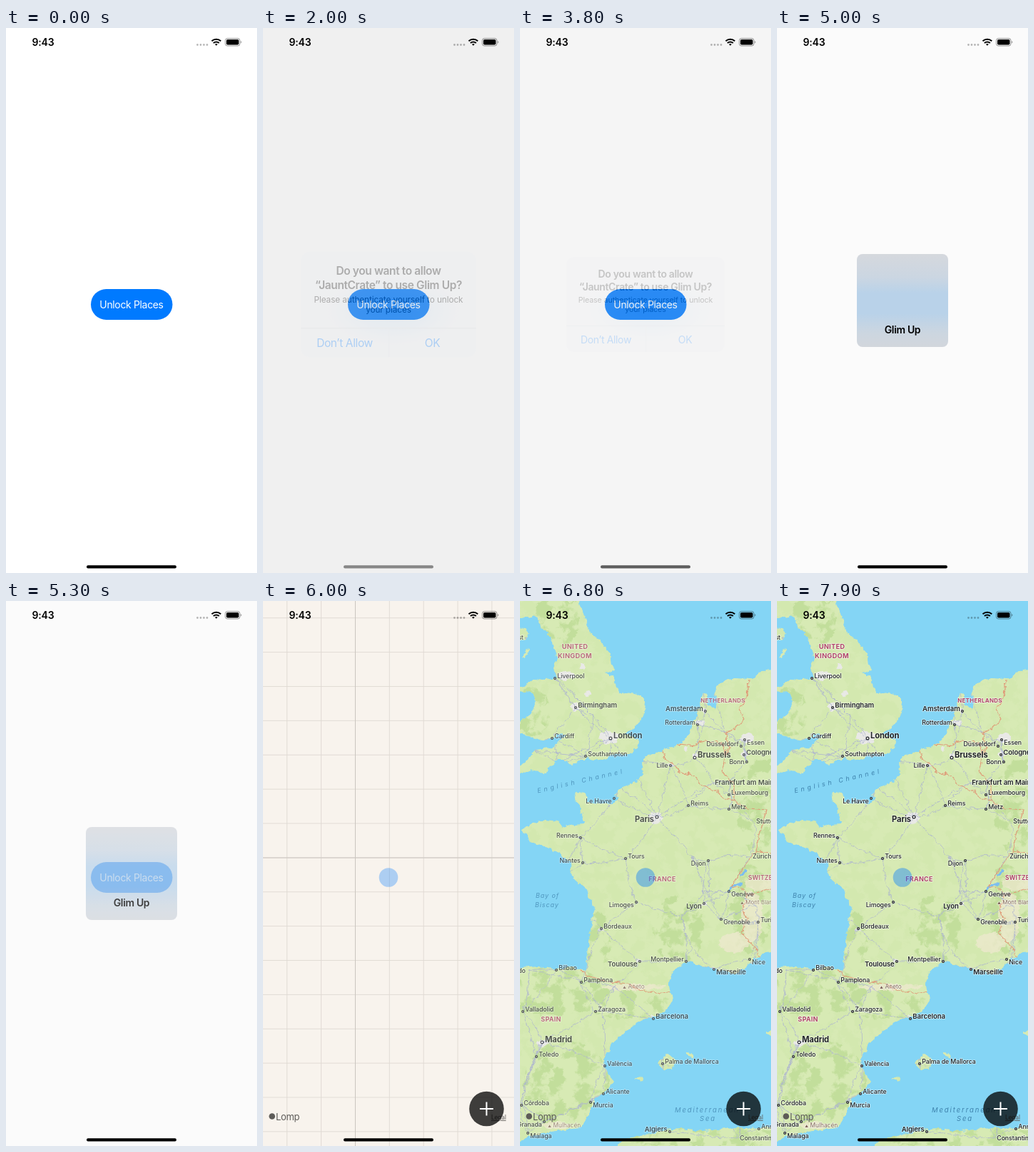
Animation, 352 px wide and 762 px high, one loop 8000 ms. Source, as an HTML page:

```html
<!DOCTYPE html>
<html lang="en">
<head>
<meta charset="utf-8">
<style>
  html, body { margin: 0; width: 100%; height: 100%; overflow: hidden; background: #fff; }
  svg { display: block; width: 352px; height: 762px; font: 14px Inter, sans-serif; }
  .ui text { letter-spacing: -.025em; }
  .mid { text-anchor: middle; }
  .bold { font-weight: 600; }
  #labels text { paint-order: stroke; stroke: #fff9; stroke-width: 1.6px; stroke-linejoin: round; fill: #202326; }
  #labels .country { fill: #b0456a; font-weight: 700; text-anchor: middle; letter-spacing: .03em; }
  #labels .sea { fill: #3f83ad; stroke: none; font-style: italic; letter-spacing: .2em; }
  #labels .peak { fill: #80675a; }
</style>
</head>
<body>
<svg viewBox="0 0 352 762">
  <defs>
    <filter id="rough" filterUnits="userSpaceOnUse" x="-10" y="-10" width="372" height="782" color-interpolation-filters="sRGB">
      <feTurbulence type="fractalNoise" baseFrequency=".12" numOctaves="3" seed="5"/>
      <feColorMatrix values="1 0 0 0 0  0 1 0 0 0  0 0 1 0 0  0 0 0 0 1" result="noise"/>
      <feDisplacementMap in="SourceGraphic" in2="noise" scale="8" xChannelSelector="R" yChannelSelector="G"/>
    </filter>
    <filter id="forest" filterUnits="userSpaceOnUse" x="0" y="0" width="352" height="762" color-interpolation-filters="sRGB">
      <feTurbulence type="fractalNoise" baseFrequency=".05" numOctaves="5" seed="8"/>
      <feColorMatrix values="0 0 0 0 0  0 0 0 0 0  0 0 0 0 0  9 0 0 0 -4.2" result="noise"/>
      <feComposite in="SourceGraphic" in2="noise" operator="in"/>
    </filter>
    <radialGradient id="glow">
      <stop stop-color="#a9d0f5" stop-opacity=".6"/>
      <stop offset=".5" stop-color="#b9d8f5" stop-opacity=".45"/>
      <stop offset="1" stop-color="#c8dff5" stop-opacity="0"/>
    </radialGradient>
    <linearGradient id="frost" x2="0" y2="1">
      <stop stop-color="#d5d8dd"/><stop offset=".25" stop-color="#cbd6e2"/>
      <stop offset=".42" stop-color="#b9d2e9"/><stop offset=".64" stop-color="#b9d2e9"/>
      <stop offset=".85" stop-color="#ccd6e0"/><stop offset="1" stop-color="#d2d6dc"/>
    </linearGradient>
    <clipPath id="land">
      <path d="M-9-9H80L88 15 95 35 98 46 112 55 126 72 128 88 133 96 121 101 131 106 137 128 150 127 166 130 176 141 175 156 164 173 155 182 145 187 160 190 167 197 165 207 150 213 133 214 118 220 105 222 93 220 82 223 74 229 64 223 50 223 41 231 35 243 27 238 14 236-9 245V234L6 227 15 217 22 208 41 206 52 199 62 188 57 184 48 191 34 195 15 190-9 184V172L8 165 18 155 22 141 17 128-9 124 9 117 20 109 36 110 51 108 47 95 52 80 46 62 40 47 31 38 24 23 12 21-9 27Z"/>
      <path d="M4 318 20 310 36 306 53 308 60 317 75 313 91 312 87 296 80 281 78 268 92 269 95 281 111 283 130 284 138 277 131 272 141 262 160 253 173 245 172 222 181 215 200 209 225 199 238 186 243 170 251 150 257 127 265 128 262 145 274 151 280 140 272 130 279 114 300 108 325 109 340 97 365 95V488L338 494 321 509 300 522 284 517 268 514 255 512 240 504 225 509 212 520 208 535 214 556 90 527 94 501 98 468 102 438 105 430 96 412 92 402 78 390 70 376 73 363 60 358 45 346 30 342 15 338Z"/>
      <path d="M-9 513 25 510 50 515 75 513 88 516 210 545 215 560 204 574 187 581 164 590 148 603 130 618 118 640 119 655 132 671 120 685 106 696 96 718 84 737 62 739 38 743 18 746-9 762Z"/>
      <path d="M125 770 145 753 175 746 205 740 225 738 255 741 290 738 360 735V770ZM192 646 207 634 220 641 213 655 201 655ZM230 630 243 634 241 638ZM162 668 172 663 170 671ZM346 604 360 596V614ZM4 76 10 66 13 69 8 78ZM-9 37 6 38 13 46 8 54-9 58Z"/>
    </clipPath>
  </defs>

  <g id="home" class="ui">
    <rect id="backdrop" width="352" height="762"/>
    <rect x="119" y="365" width="114.5" height="43" rx="21.5" fill="#007aff"/>
    <text class="mid" x="176" y="391.5" fill="#fff">Unlock Places</text>
  </g>

  <g id="map">
    <rect width="352" height="762" fill="#f8f3ed"/>
    <path id="grid" fill="none" stroke="#dfdad3" stroke-width=".9"/>
    <path d="M129.500 0V762M0 359H352" stroke="#cbc6c0"/>
    <g id="tiles">
      <rect width="352" height="762" fill="#84d5f5"/>
      <g filter="url(#rough)"><g clip-path="url(#land)">
        <rect x="-9" y="-9" width="372" height="782" fill="#d7eab4"/>
        <g filter="url(#forest)" fill="#c2de9b">
          <rect width="352" height="762" opacity=".2"/>
          <g id="woods"></g>
        </g>
        <g id="hills" fill="#efe8d0" opacity=".7"></g>
        <g id="towns" fill="#e9e9e6"></g>
        <path id="roads" fill="none" stroke="#adb3d0" stroke-width=".75"/>
        <path d="M291 407 298 398 312 396M308 384 318 376" stroke="#7cbdf0" stroke-width="3" fill="none"/>
        <path fill="none" stroke="#df9c79" stroke-width="1.2" d="M85 516 95 525 112 530 132 533 150 535 165 543 190 548 215 545M198 209 205 222 216 228 225 240 245 245 255 258 275 265 285 275 300 280 320 290 345 292 338 320 330 350 352 353M222 200 240 202 262 195 284 200 290 215M320 111 318 135 308 150 315 165 301 178 288 185 293 205 288 215 285 240 300 255 300 278M330 350 311 375 295 400 312 402 320 411 352 402M320 411 312 430 318 445 311 465 330 485 336 497"/>
      </g></g>
    </g>
    <g id="labels"></g>
    <circle id="pin" cx="176" cy="386.500" r="13.300" fill="#007aff"/>
    <g class="ui" fill="#5d5b58">
      <circle cx="12.700" cy="720.500" r="4.300"/>
      <text x="18" y="725.500" font-size="13">Lomp</text>
      <text x="320" y="725" font-size="8.500" text-decoration="underline">Legal</text>
    </g>
    <circle cx="313.500" cy="710" r="24.300" opacity=".75"/>
    <path d="M304 710H323M313.500 700.500V719.500" stroke="#fff" stroke-width="2"/>
  </g>

  <rect id="dim" width="352" height="762"/>
  <g id="alert" class="ui mid">
    <rect x="65" y="320" width="222" height="133" rx="11" fill="#ebedf1"/>
    <ellipse cx="182" cy="394" rx="85" ry="44" fill="url(#glow)"/>
    <path d="M65 416.500H287" stroke="#cfd4da" stroke-width=".8"/>
    <path d="M176.500 417V453" stroke="#dde2e8" stroke-width=".8"/>
    <g class="bold">
      <text x="176" y="349">Do you want to allow</text>
      <text x="176" y="367">“JauntCrate” to use Glim Up?</text>
    </g>
    <g font-size="10.700">
      <text x="176" y="384" style="letter-spacing:-.01em">Please authenticate yourself to unlock</text>
      <text x="176" y="397" style="letter-spacing:-.01em">your places</text>
    </g>
    <g fill="#007aff">
      <text x="120.500" y="440.500">Don’t Allow</text>
      <text x="231.500" y="440.500">OK</text>
    </g>
  </g>
  <g id="scan" class="ui mid bold">
    <rect x="112" y="316" width="128" height="130" rx="8" fill="url(#frost)"/>
    <text x="176" y="426.500">Glim Up</text>
  </g>

  <text class="bold" x="36.500" y="25" letter-spacing="-.2">9:43</text>
  <path d="M268.500 23.500H283" stroke="#000" stroke-opacity=".28" stroke-width="2.800" stroke-linecap="round" stroke-dasharray="0 4.500"/>
  <g fill="none" stroke="#000" stroke-width="2">
    <path d="M288.500 18.300a9.300 9.300 0 0 1 12.800 0M290.900 21a5.800 5.800 0 0 1 8 0"/>
    <path d="M293 22.800a2.900 2.900 0 0 1 3.800 0L294.900 24.700Z" fill="#000" stroke="none"/>
  </g>
  <rect x="307.500" y="14.500" width="20.500" height="10.500" rx="3" fill="none" stroke="#000" stroke-opacity=".4"/>
  <rect x="309" y="16" width="17.500" height="7.500" rx="1.800"/>
  <path d="M329.200 18v3.500q1.200-.5 1.200-1.750t-1.200-1.750" opacity=".4"/>
  <rect id="bar" x="113" y="751.300" width="126" height="4.200" rx="2.100"/>
</svg>

<script>
const $ = id => document.getElementById(id);

// name, dot x, dot y, label side (l/r) and height (u/c/d)
const parse = list => list.trim().split(/\s*;\s*/).map(row => {
  const [name, x, y, place] = row.split(',');
  return { name, x: +x, y: +y, left: place[0] === 'l', rise: place[1] };
});
const tiers = [
  { size: 11.2, weight: 700, cities: parse(`London,127,192,ru; Brussels,245,219,ru; Paris,192,302,ld; Madrid,31,617,ru`) },
  { size: 9.6, weight: 600, cities: parse(`Birmingham,78,149,ru; Amsterdam,260,154,lu; Cologne,314,215,ru; Lyon,258,423,ld;
    Toulouse,168,504,ld; Marseille,272,515,rd; Barcelona,187,584,ru; Algiers,210,742,lu; Frankfurt am Main,270,254,rc`) },
  { size: 8.8, weight: 500, cities: parse(`Liverpool,49,108,ru; Cardiff,45,192,ru; Southampton,92,217,ru; Rotterdam,249,173,lu;
    Lille,211,230,lc; Düsseldorf,310,203,lu; Essen,315,194,rd; Bonn,318,225,lc; Luxembourg,293,271,ru; Reims,236,286,ru;
    Metz,293,291,ru; Stuttgart,328,308,rc; Le Havre,132,276,ld; Rennes,85,331,lu; Nantes,88,366,lu; Tours,148,360,ru;
    Dijon,264,363,ld; Zürich,323,357,rc; Limoges,163,421,ld; Genève,293,406,rd; Grenoble,282,445,rd; Turin,334,449,ru;
    Bordeaux,114,458,ru; Montpellier,233,504,lu; Nice,322,501,rd; Bilbao,51,516,ru; Pamplona,86,533,ru; Zaragoza,106,574,ru;
    Valladolid,4,574,ru; Toledo,23,637,ru; València,119,650,ru; Palma de Mallorca,200,647,ru; Alicante,117,689,ru;
    Murcia,99,701,rd; Córdoba,2,705,ru; Granada,34,728,ld; Málaga,11,744,rd; Constantine,305,751,rc; Annaba,335,738,ru;
    Oviedo,11,517,lc; Belfast,8,51,lc`) },
];
const hidden = ['Frankfurt am Main', 'Stuttgart', 'Zürich', 'Oviedo', 'Belfast', 'Constantine'];
const lift = { u: 0, c: 3.2, d: 6.8 };

const cityLabel = ({ size, weight }) => ({ name, x, y, left, rise }) => {
  const r = size > 11 ? 1.9 : 1.4, gap = size > 11 ? 4 : 3.3;
  const dot = hidden.includes(name) ? '' : `<circle cx="${x}" cy="${y}" r="${r}" fill="#fff" stroke="#202326" stroke-width="1.2"/>`;
  return `${dot}<text x="${left ? x - gap : x + gap}" y="${y + lift[rise]}" font-size="${size}" font-weight="${weight}"
    letter-spacing="-.1" text-anchor="${left ? 'end' : 'start'}">${name}</text>`;
};
const areaLabel = (kind, x, y, size, name, more = '') =>
  `<text class="${kind}" x="${x}" y="${y}" font-size="${size}" ${more}>${name}</text>`;

$('labels').innerHTML = tiers.map(tier => tier.cities.map(cityLabel(tier)).join('')).join('') + [
  areaLabel('country', 77, 67, 9.3, 'UNITED'),
  areaLabel('country', 77, 79.5, 9.3, 'KINGDOM'),
  areaLabel('country', 284.5, 142, 8, 'NETHERLANDS'),
  areaLabel('country', 199.5, 392, 9, 'FRANCE'),
  areaLabel('country', 43.5, 588, 9, 'SPAIN'),
  areaLabel('country', 352, 390, 8.3, 'SWITZERLAND'),
  areaLabel('sea', 25, 268.5, 9, 'English Channel', 'transform="rotate(-13 25 268)" style="letter-spacing:.42em"'),
  areaLabel('sea', 22, 415, 9, 'Bay of', 'style="letter-spacing:.1em"'),
  areaLabel('sea', 21, 427.5, 9, 'Biscay', 'style="letter-spacing:.1em"'),
  areaLabel('sea', 217, 714.5, 9.5, 'Mediterranean'),
  areaLabel('sea', 252, 727, 9.5, 'Sea'),
  areaLabel('peak', 309, 424, 8, '<tspan font-size="5">▲</tspan> Mont Blanc'),
  areaLabel('peak', 144, 542, 8.4, '<tspan font-size="5">▲</tspan> Aneto'),
  areaLabel('peak', 39, 736, 8.4, '<tspan font-size="5">▲</tspan> Mulhacén'),
].join('');

const ellipses = list => list.map(([x, y, rx, ry = rx]) => `<ellipse cx="${x}" cy="${y}" rx="${rx}" ry="${ry}"/>`).join('');
$('woods').innerHTML = ellipses([[45, 545, 80, 34], [150, 562, 60, 22], [222, 460, 36, 48], [322, 430, 32, 62],
  [16, 155, 28, 34], [52, 25, 32, 40], [345, 290, 42, 70], [65, 675, 60, 60], [110, 475, 18, 40], [260, 750, 120, 14]]);
$('hills').innerHTML = ellipses([[325, 442, 15, 36], [300, 478, 20, 14], [160, 540, 45, 4], [340, 395, 25, 10], [50, 733, 20, 5]]);
$('towns').innerHTML = ellipses([[125, 191, 13, 9], [190, 302, 9, 8], [78, 148, 6], [64, 104, 12, 6], [88, 91, 3, 5], [95, 130, 4],
  [319, 192, 10, 7], [315, 214, 4], [246, 217, 4], [232, 207, 3], [253, 170, 6, 4], [259, 153, 3], [211, 229, 4, 3],
  [31, 618, 8, 5], [258, 424, 3], [114, 459, 3], [187, 582, 3], [272, 514, 3], [168, 504, 3], [119, 650, 3]]);

let seed = 7;
const random = () => (seed = seed * 16807 % 2147483647) / 2147483647;

// Each junction gets one gently bent road to each of its nearest neighbours.
const cities = tiers.flatMap(tier => tier.cities);
const junctions = [...cities, ...Array.from({ length: 22 }, () => ({ x: random() * 352, y: random() * 762 }))];
const distance = (a, b) => Math.hypot(a.x - b.x, a.y - b.y);
const bend = () => (random() - .5) * 14;
const roads = new Map();
junctions.forEach((a, i) => {
  const reach = a.name === 'Paris' ? 8 : a.name === 'London' || a.name === 'Madrid' ? 6 : 3;
  const near = [...junctions].sort((b, c) => distance(a, b) - distance(a, c)).slice(1, reach + 1);
  for (const b of near) {
    const j = junctions.indexOf(b);
    roads.set(Math.min(i, j) + '-' + Math.max(i, j),
      `M${a.x} ${a.y}Q${(a.x + b.x) / 2 + bend()} ${(a.y + b.y) / 2 + bend()} ${b.x} ${b.y}`);
  }
});
$('roads').setAttribute('d', [...roads.values()].join(''));

const CELL = 47.88;
let lines = '';
for (let y = 23.7; y < 762; y += CELL) lines += `M0 ${y}H352`;
for (let x = 33.7; x < 352; x += CELL) lines += `M${x} 0V762`;
$('grid').setAttribute('d', lines);

const ramp = (t, from, to) => Math.min(1, Math.max(0, (t - from) / (to - from)));
const easeOut = u => 1 - (1 - u) ** 1.8;
const fade = (id, value) => {
  $(id).style.opacity = value;
  $(id).style.visibility = value > 0 ? 'visible' : 'hidden';
};

function draw() {
  const t = Math.floor(performance.now() % 8000 / 100) * 100;
  const shown = easeOut(ramp(t, 1900, 2500));
  const alert = shown * (1 - easeOut(ramp(t, 3500, 4000)));
  const zoom = 1 + .15 * (1 - shown);
  const tiles = ramp(t, 6000, 6300);

  $('backdrop').setAttribute('fill', t < 4000 ? '#fff' : '#fbfbfb');
  fade('dim', .204 * alert);
  fade('alert', alert);
  $('alert').setAttribute('transform', `translate(176 386.5) scale(${zoom}) translate(-176 -386.5)`);
  fade('bar', Math.max(0, 1 - 2 * alert));
  fade('scan', easeOut(ramp(t, 4100, 4600)) * (1 - ramp(t, 5200, 5600)));
  fade('map', t < 5500 ? 0 : 1);
  if (t < 5500) for (const id of ['tiles', 'labels', 'pin']) fade(id, 0);
  else {
    fade('tiles', tiles);
    fade('labels', ramp(t, 6500, 6900));
    fade('pin', .3 + .1 * tiles);
  }
  requestAnimationFrame(draw);
}
draw();
</script>
</body>
</html>
```
